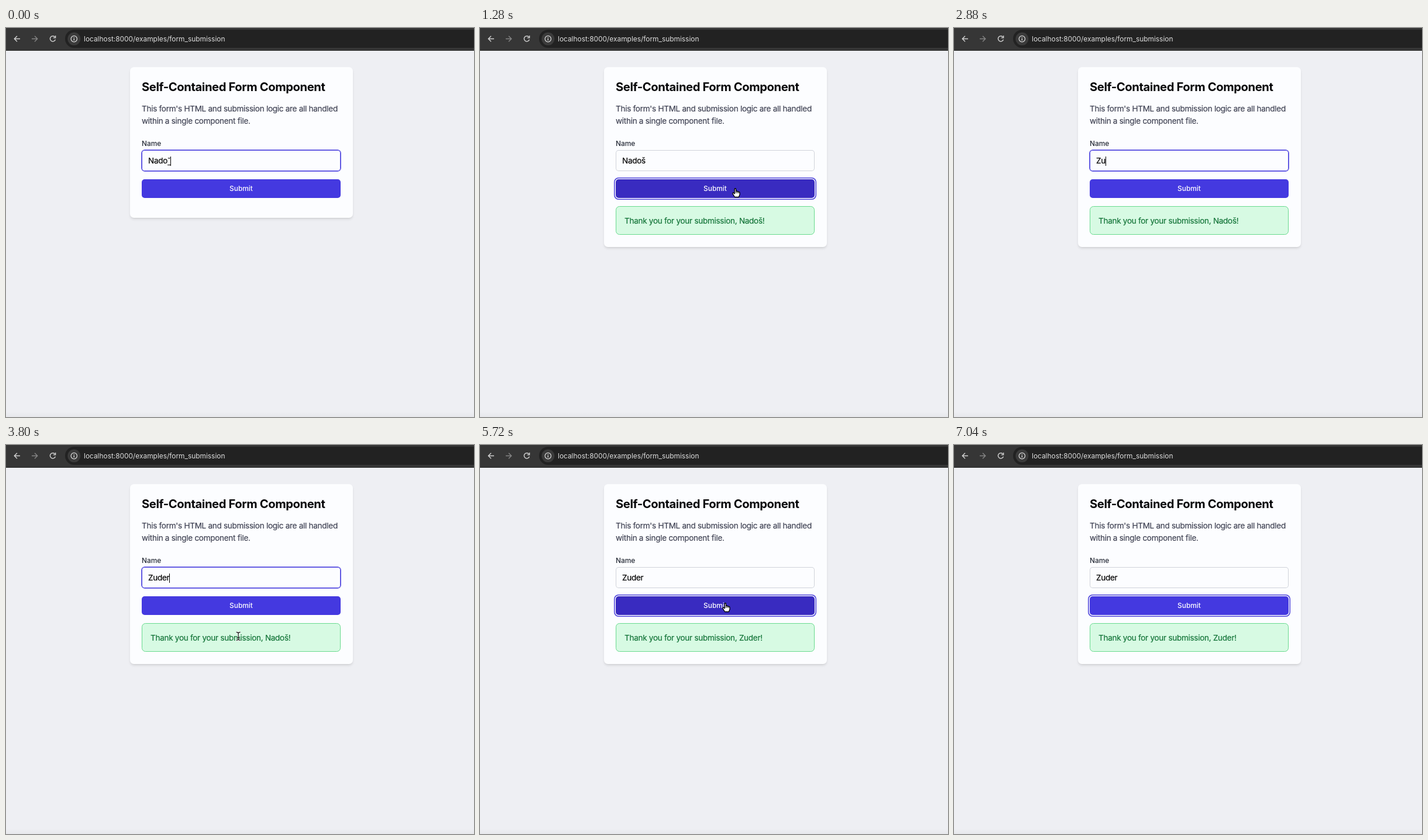
An HTML page that plays this animation: 800x666 px, repeating every 7.08 s.

```html
<!DOCTYPE html>
<html lang="en">
<head>
<meta charset="utf-8">
<title>Form submission</title>
<style>
html, body { margin: 0; width: 100%; height: 100%; overflow: hidden; }
body { position: relative; background: #eeeff3; font: 13.5px/20.4px Inter, "Open Sans", sans-serif; letter-spacing: -.27px; }
body > *, #card > * { position: absolute; box-sizing: border-box; white-space: pre; margin: 0; }
#bar { left: 0; top: 0; width: 100%; height: 39px; background: #363636; border-bottom: 1px solid #2c2c2c; }
#pill { left: 101px; top: 3px; width: 720px; height: 31px; border-radius: 16px; background: #222; }
#icons { left: 0; top: 0; }
#url { left: 133px; top: 9px; font-size: 11.9px; letter-spacing: 0; color: #dedede; }
#shade { left: 0; right: 0; bottom: 0; height: 9px; background: linear-gradient(#0000, #00000008); }
#card { left: 211.5px; top: 66.5px; width: 381px; border-radius: 6.5px; background: #fcfdff;
  box-shadow: 0 3px 5px -1px #0000001c, 0 1.7px 3.4px -1.7px #0000001c; }
#card > * { left: 20.5px; }
h1 { top: 20.4px; font-size: 20.2px; line-height: 28px; letter-spacing: -.4px; color: #050507; }
p { top: 61.7px; color: #404354; }
p, #value, #note { -webkit-text-stroke: .2px; }
#label { top: 121.2px; font-size: 11.9px; font-weight: 500; letter-spacing: 0; color: #272c38; }
#field, #button, #note { width: 340px; }
#field { top: 142.5px; height: 36px; padding: 0 11px; border-radius: 5px; line-height: 36px; color: #000; }
#dead { text-decoration: underline 1px; text-underline-offset: 2px; }
#caret { display: inline-block; width: 1px; height: 16px; margin-right: -1px; background: #000; vertical-align: -3.5px; }
#button { top: 192.5px; height: 32px; border-radius: 5px; text-align: center;
  font-size: 11.9px; font-weight: 500; line-height: 32px; letter-spacing: 0; color: #fff; }
#note { top: 238.5px; height: 49px; padding-left: 14px; border: 1px solid #68da8e;
  border-radius: 6.5px; background: #d7fae3; color: #137438; line-height: 48px; }
#cursor { left: 0; top: 0; overflow: visible; }
</style>
</head>
<body>
<div id="bar"></div>
<div id="pill"></div>
<svg id="icons" width="130" height="39" fill="none" stroke="#d2d2d2" stroke-width="1.4">
  <path d="M24 18.5H14.5M19 13.8L14.3 18.5L19 23.2"/>
  <path stroke="#858585" d="M44 18.5H53.5M49 13.8L53.7 18.5L49 23.2"/>
  <path d="M83.7 15.6A4.6 4.6 0 1 0 84.4 19.8M84.6 13V16.9H80.7"/>
  <circle cx="116.3" cy="18.6" r="11" fill="#3b3b3b" stroke="none"/>
  <circle cx="116.3" cy="18.6" r="5.2" stroke-width="1.3"/>
  <path d="M116.3 17.8V21.6M116.3 15.5V16.8"/>
</svg>
<div id="url">localhost:8000/examples/form_submission</div>
<div id="shade"></div>
<div id="card">
  <h1>Self-Contained Form Component</h1>
  <p>This form's HTML and submission logic are all handled
within a single component file.</p>
  <div id="label">Name</div>
  <div id="field"><span id="value"></span><span id="dead">ˇ</span><span id="caret"></span></div>
  <div id="button">Submit</div>
  <div id="note"></div>
</div>
<svg id="cursor" width="1" height="1">
  <defs><path id="stem" d="M-3.5 -7Q-.5 -7 0 -5Q.5 -7 3.5 -7M0 -5V5M-3.5 7Q-.5 7 0 5Q.5 7 3.5 7M-1.8 2.5H1.8"/></defs>
  <g id="hand" fill="#fff" stroke="#000" stroke-width="1.3" stroke-linejoin="round">
    <path d="M-2.5 7.5L-6 1.8Q-6.6 0 -5 0L-2.8 1.8V-6.3Q-1.7 -8.2 -.5 -6.3V-2.3Q.8 -3.4 1.8 -1.9Q3 -2.8 4 -1.3Q5.8 -1.8 6 .2V3.2L4.3 7.5Z"/>
    <path d="M-.5 -2.3V1M1.8 -1.9V1M4 -1.3V1.2" fill="none" stroke-width=".9"/>
  </g>
  <g id="beam" fill="none">
    <use href="#stem" stroke="#fff" stroke-width="2.6"/>
    <use href="#stem" stroke="#111" stroke-width="1.2"/>
  </g>
  <path id="arrow" d="M-4.5 -8V5.2L-1.6 2.6L.4 7.4L2.7 6.4L.7 1.8H4.8Z" fill="#000" stroke="#fff" stroke-width="1.1"/>
</svg>
<script>
const LOOP = 7080;
const $ = id => document.getElementById(id);
const clamp = v => Math.max(0, Math.min(1, v));
const ease = v => v * v * (3 - 2 * v);
const within = (v, a, b) => v >= a && v < b;
const show = (id, on) => $(id).style.display = on ? '' : 'none';

const FIRST = 'Nadoš', SECOND = 'Zuder';

// [time, field text]
const typing = [[0, FIRST.slice(0, 4)], [200, FIRST]];
for (let n = 4; n >= 0; n--) typing.push([2440 + (4 - n) * 50, FIRST.slice(0, n)]);
[2720, 2840, 3080, 3280, 3480].forEach((t, i) => typing.push([t, SECOND.slice(0, i + 1)]));

// [time, x, y] of each visible pointer stretch
const paths = [
  [[540, 436, 232], [720, 438, 270], [1000, 438, 282], [1420, 438, 282], [1900, 398, 229], [2200, 398, 229], [2420, 388, 374]],
  [[3760, 397, 328], [4320, 405, 284], [4680, 408, 275], [5100, 416, 278], [5720, 421, 278], [5880, 421, 278], [6400, 716, -10]]
];

function pointer(t) {
  const path = paths.find(p => within(t, p[0][0], p[p.length - 1][0]));
  if (!path) return null;
  const i = path.findIndex(k => k[0] > t), a = path[i - 1], b = path[i];
  const f = ease((t - a[0]) / (b[0] - a[0]));
  return [a[1] + (b[1] - a[1]) * f, a[2] + (b[2] - a[2]) * f];
}

function pointerKind(x, y) {
  if (y < 36) return 'beam';
  if (!within(x, 232, 572)) return 'arrow';
  if (within(y, 259, 292)) return 'hand';
  return within(y, 209, 245) || within(y, 129, 169) || within(y, 320, 340) ? 'beam' : 'arrow';
}

function draw(t) {
  const [typedAt, text] = typing.filter(k => k[0] <= t).pop();
  const focused = t < 960 || within(t, 1900, 5120);
  const blinkFrom = t >= 1900 ? Math.max(typedAt, 1900) : typedAt;
  $('value').textContent = text;
  show('dead', t < 200);
  show('caret', focused && (t - blinkFrom) % 1000 < 500);
  $('field').style.boxShadow = focused
    ? 'inset 0 0 0 1px #4f46df, 0 0 0 .8px #4f46df' : 'inset 0 0 0 1px #d0d3da';

  const hover = clamp((t - 760) / 130) - clamp((t - 1580) / 130)
    + clamp((t - 4740) / 130) - clamp((t - 5920) / 130);
  $('button').style.background = `color-mix(in srgb, #392bc0 ${hover * 100}%, #4439e0)`;
  $('button').style.boxShadow = focused ? 'none' : '0 0 0 1.5px #fcfdff, 0 0 0 3px #4a40da';

  const sent = t >= 1040;
  show('note', sent);
  $('note').textContent = `Thank you for your submission, ${t < 5200 ? FIRST : SECOND}!`;
  $('card').style.height = sent ? '308px' : '258px';

  const pos = pointer(t);
  show('cursor', pos);
  if (pos) {
    const kind = pointerKind(...pos);
    for (const id of ['hand', 'beam', 'arrow']) show(id, id === kind);
    $('cursor').style.transform = `translate(${pos[0]}px, ${pos[1]}px)`;
  }
}

const start = performance.now();
function tick() {
  draw((performance.now() - start) % LOOP);
  requestAnimationFrame(tick);
}
tick();
</script>
</body>
</html>
```
